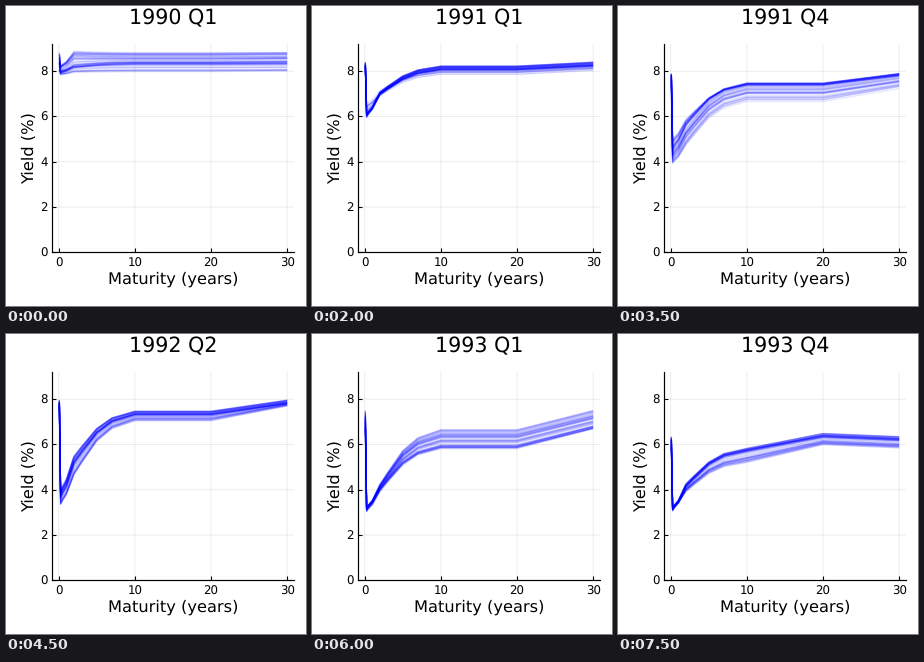
Animation of 300x300 px, one loop 8000 ms. Source, as a matplotlib script:

```python
import numpy as np
import matplotlib.pyplot as plt
from matplotlib.animation import FuncAnimation
from matplotlib.collections import LineCollection

PX = 0.72  # points per pixel at 100 dpi
QUARTERS, DAYS = 16, 62
TENORS = [1 / 12, 0.25, 0.5, 1, 2, 3, 5, 7, 10, 20, 30]

# Turning points as (quarter, percent)
SHORT = [(0, 7.85), (0.8, 8.2), (2, 7.9), (3.7, 7.0), (4.3, 6.1), (6.5, 5.5),
         (8, 3.95), (9, 4.0), (10.3, 3.2), (11, 2.9), (12, 3.15), (16, 3.15)]
LONG = [(0, 7.98), (0.3, 8.45), (1.3, 8.9), (2.1, 8.4), (2.8, 8.95), (3.9, 8.05),
        (5.8, 8.25), (6.6, 7.55), (7.5, 7.45), (8, 6.75), (8.9, 7.5), (9.8, 7.25),
        (11, 6.35), (11.7, 6.85), (12.8, 5.95), (13.5, 6.0), (15.1, 5.25), (15.6, 5.75)]
# Place of 2Y between 3M and 10Y, and spread of 30Y over 10Y
BELLY = [(0, 0.6), (0.8, 1.1), (3, 0.36), (5, 0.48), (8, 0.32),
         (8.9, 0.45), (11, 0.28), (16, 0.4)]
SPREAD = [(0, 0.03), (2, 0), (3, 0.13), (6, 0.2), (8, 0.55),
          (9.5, 0.48), (10.6, 0.85), (14, 0.85), (16, 0.45)]


def path(points, t):
    return np.interp(t, *zip(*points))


def drift(rng, n, size, keep=0.85):
    """Mean-reverting daily noise."""
    out = np.zeros(n)
    for i, step in enumerate(rng.normal(0, size * np.sqrt(1 - keep**2), n)):
        out[i] = keep * out[i - 1] + step
    return out


def mix(a, b, w):
    return a + (b - a) * w


def build_curves():
    rng = np.random.default_rng(7)
    n = QUARTERS * DAYS
    t = np.arange(n) / DAYS
    level = drift(rng, n, 0.06)

    m3 = path(SHORT, t) + 0.3 * level + drift(rng, n, 0.04)
    y10 = path(LONG, t) + level
    y2 = mix(m3, y10, path(BELLY, t)) + 0.4 * level + drift(rng, n, 0.03)
    y30 = y10 + path(SPREAD, t) - 0.15 * level + drift(rng, n, 0.015)
    y1 = mix(m3, y2, 0.33)
    y5 = mix(y2, y10, 0.62)
    # 20Y repeats 10Y until the last quarter; 1M repeats the day before's 30Y
    y20 = np.where(t < QUARTERS - 1, y10, y30 + 0.14)
    m1 = np.concatenate([y30[:1], y30[:-1]])

    table = [m1, m3, mix(m3, y1, 0.4), y1, y2, mix(y2, y5, 0.35),
             y5, mix(y5, y10, 0.62), y10, y20, y30]
    yields = np.round(np.array(table).T, 2)
    x = np.broadcast_to(TENORS, yields.shape)
    return np.stack([x, yields], axis=2).reshape(QUARTERS, DAYS, len(TENORS), 2)


curves = build_curves()

plt.rcParams.update({"font.family": "DejaVu Sans", "text.hinting": "no_hinting"})
fig = plt.figure(figsize=(3, 3), dpi=100, facecolor="white")
ax = fig.add_axes([46.4 / 300, 53.6 / 300, 241.6 / 300, 208.4 / 300])
ax.set(xlim=(-0.83, 30.9), ylim=(0, 9.2))
ax.set_xticks(range(0, 31, 10))
ax.set_yticks(range(0, 9, 2))
ax.tick_params(direction="in", length=4 * PX, width=1.1 * PX,
               labelbottom=False, labelleft=False)
ax.grid(color="black", alpha=0.1, linewidth=0.7 * PX, snap=False)
ax.set_axisbelow(True)
ax.spines[["top", "right"]].set_visible(False)
ax.spines[["left", "bottom"]].set_linewidth(1.2 * PX)


def label(x, y, text, size, ha="center", **kw):
    """Text at pixel coordinates counted from the top left."""
    return fig.text(x / 300, 1 - y / 300, text, fontsize=size * PX,
                    ha=ha, va="baseline", **kw)


for v in range(0, 31, 10):
    label(52.7 + 7.616 * v, 260.5, str(v), 11.8)
for v in range(0, 9, 2):
    label(42, 250.8 - 22.66 * v, str(v), 11.8, ha="right")
label(167.2, 278, "Maturity (years)", 16.3)
label(27.5, 142.3, "Yield (%)", 16.3, rotation=90, rotation_mode="anchor")
title = label(167.2, 18.3, "", 20.6)

lines = LineCollection([], colors=[(0, 0, 1, 0.1)], linewidths=1.3 * PX, zorder=3)
ax.add_collection(lines, autolim=False)


def update(q):
    lines.set_segments(curves[q])
    title.set_text(f"{1990 + q // 4} Q{q % 4 + 1}")
    return lines, title


anim = FuncAnimation(fig, update, frames=QUARTERS, interval=500,
                     repeat=True, repeat_delay=0)
plt.show()
```
